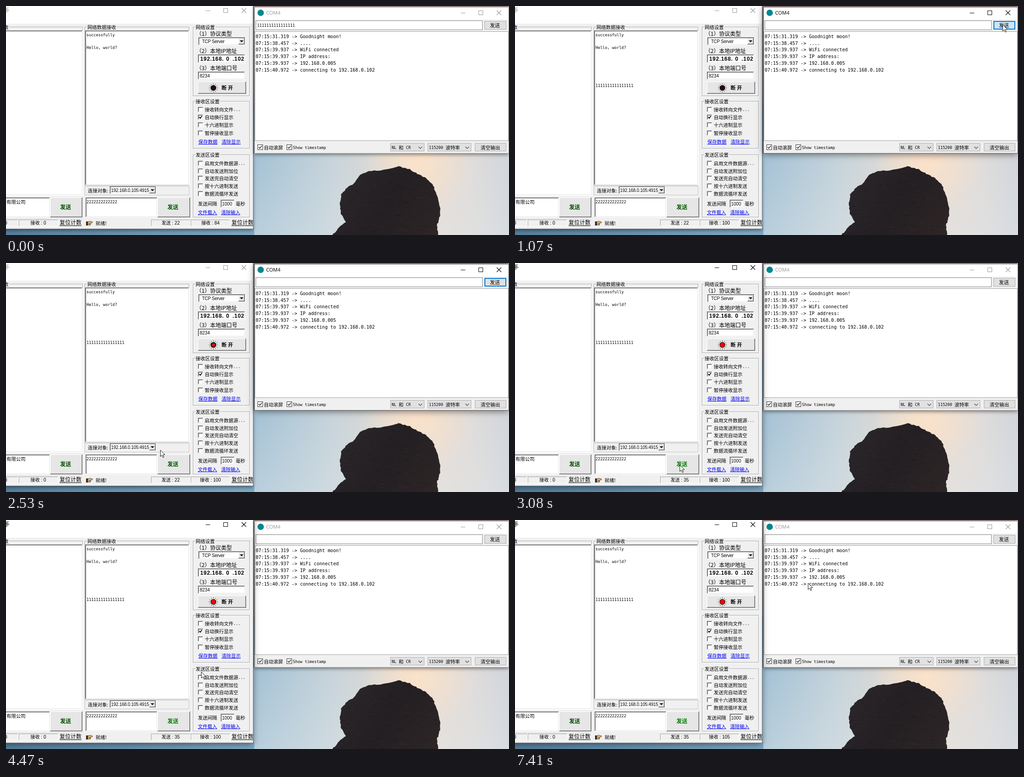
An HTML page with a canvas that plays this animation: 1106x506 px, repeating every 8000 ms.

```html
<!DOCTYPE html>
<html lang="zh-CN">
<head>
<meta charset="utf-8">
<title>Serial and TCP test</title>
<style>
html, body { margin: 0; width: 100%; height: 100%; overflow: hidden; background: #f0f0f0; }
canvas { display: block; width: 1106px; height: 506px; }
</style>
</head>
<body>
<canvas id="stage" width="1106" height="506"></canvas>
<script>
const c = document.getElementById('stage').getContext('2d');
const LOOP = 8000, STEP = 76.9, START = 145;
const CJK = '"Noto Sans CJK SC","Noto Sans CJK",sans-serif';
const SANS = '"Liberation Sans","Noto Sans CJK SC",sans-serif';
const MONO = '"DejaVu Sans Mono","Noto Sans CJK SC",monospace';
const FACE = '#f0f0f0';

// --- drawing helpers ---
function rect(x, y, w, h, color) { c.fillStyle = color; c.fillRect(x, y, w, h); }

function box(x, y, w, h, fill, edge, t = 1) {
  rect(x, y, w, h, edge);
  rect(x + t, y + t, w - 2 * t, h - 2 * t, fill);
}

// y is the visual middle of the line
function text(s, x, y, size = 10.5, family = CJK, color = '#000', align = 'left', weight = '') {
  c.font = `${weight} ${size}px ${family}`;
  c.fillStyle = color;
  c.textAlign = align;
  c.fillText(s, x, y + size * 0.37);
}
const mono = (s, x, y, size = 8.65, color) => text(s, x, y, size, MONO, color);
const sans = (s, x, y, size = 10, align) => text(s, x, y, size, SANS, '#000', align);

function spaced(gap, draw) {
  c.letterSpacing = gap + 'px';
  draw();
  c.letterSpacing = '0px';
}

function line(points, color, width = 1) {
  c.beginPath();
  points.forEach(([x, y], i) => i ? c.lineTo(x, y) : c.moveTo(x, y));
  c.strokeStyle = color;
  c.lineWidth = width;
  c.stroke();
}

function disc(x, y, r, color) {
  c.beginPath();
  c.arc(x, y, r, 0, Math.PI * 2);
  c.fillStyle = color;
  c.fill();
}

function gradient(x0, y0, x1, y1, ...stops) {
  const g = c.createLinearGradient(x0, y0, x1, y1);
  stops.forEach(([at, color]) => g.addColorStop(at, color));
  return g;
}

function sunken(x, y, w, h, fill = '#fff') {
  rect(x, y, w, h, '#fff');
  rect(x, y, w - 1, h - 1, '#8c8c8c');
  rect(x + 1, y + 1, w - 2, h - 2, '#e3e3e3');
  rect(x + 1, y + 1, w - 3, h - 3, '#606060');
  rect(x + 2, y + 2, w - 4, h - 4, fill);
}

function raised(x, y, w, h) {
  rect(x, y, w, h, '#666');
  rect(x, y, w - 1, h - 1, '#fff');
  rect(x + 1, y + 1, w - 2, h - 2, '#a0a0a0');
  rect(x + 1, y + 1, w - 3, h - 3, '#e6e6e6');
}

function group(x, y, w, h, label, labelX = x + 6) {
  for (const [d, color] of [[1, '#fff'], [0, '#a5a5a5']]) {
    c.strokeStyle = color;
    c.lineWidth = 1;
    c.strokeRect(x + d + 0.5, y + d + 0.5, w - 1, h - 1);
  }
  c.font = '10.5px ' + CJK;
  rect(labelX - 1, y - 4, c.measureText(label).width + 2, 9, FACE);
  text(label, labelX, y + 1);
}

function combo(x, y, w, h, s, sx) {
  sunken(x, y, w, h);
  raised(x + w - 16, y + 2, 14, h - 4);
  const mx = x + w - 9, my = y + h / 2;
  c.fillStyle = '#000';
  c.beginPath();
  c.moveTo(mx - 4, my - 2); c.lineTo(mx + 4, my - 2); c.lineTo(mx, my + 2);
  c.fill();
  spaced(-0.3, () => sans(s, sx, my));
}

function check(y, label, { on, dots } = {}) {
  sunken(422, y - 6, 12, 12);
  if (on) line([[425, y - 1], [427, y + 2], [431, y - 3]], '#000', 1.8);
  text(label, 437, y);
  if (dots) mono('...', 437 + label.length * 10.5, y);
}

function link(s, x, y) {
  text(s, x, y, 10.5, CJK, '#0000f0');
  rect(x, y + 5, 42, 1, '#0000f0');
}

function winButtons(x, y, color) {
  rect(x, y, 10, 1, color);
  c.strokeStyle = color;
  c.lineWidth = 1;
  c.strokeRect(x + 39.5, y - 4.5, 9, 9);
  line([[x + 79, y - 5], [x + 89, y + 5]], color, 1.1);
  line([[x + 89, y - 5], [x + 79, y + 5]], color, 1.1);
}

// --- desktop ---
const ROCK = [[718, 506], [729, 492], [747, 477], [737, 459], [734, 440], [737, 416], [747, 404],
  [765, 392], [779, 373], [797, 365], [830, 363], [850, 358], [863, 354], [888, 361], [905, 371],
  [924, 381], [938, 393], [945, 412], [952, 432], [955, 452], [953, 470], [948, 484], [950, 506]];

function seeded(seed) {
  return () => (seed = (seed * 16807) % 2147483647) / 2147483647;
}

function desktop() {
  rect(0, 0, 1106, 506, gradient(546, 0, 1106, 0, [0, '#a3c1d5'], [0.3, '#c6d3da'],
    [0.62, '#eaddd2'], [0.85, '#e0dcda'], [1, '#d1d5db']));
  rect(546, 326, 560, 180, gradient(0, 326, 0, 506,
    [0, 'rgba(225,232,235,0)'], [1, 'rgba(225,232,235,.35)']));
  const glow = c.createRadialGradient(905, 345, 5, 905, 345, 120);
  glow.addColorStop(0, 'rgba(252,226,200,.85)');
  glow.addColorStop(1, 'rgba(252,226,200,0)');
  rect(740, 326, 366, 180, glow);
  rect(0, 490, 546, 16, gradient(0, 0, 543, 0, [0, '#557f9c'], [1, '#7fa9c4']));
  rect(543, 0, 4, 326, gradient(0, 0, 0, 326,
    [0, '#ab9296'], [0.65, '#8d8494'], [0.66, '#5f8098'], [1, '#7595aa']));
  rect(546, 0, 560, 3, '#a99090');
  rect(1104, 0, 2, 326, '#c9aca2');

  const rnd = seeded(41);
  c.save();
  c.beginPath();
  ROCK.forEach(([x, y], i) => {
    if (!i) return c.moveTo(x, y);
    const [px, py] = ROCK[i - 1];
    for (let k = 1; k <= 5; k++) {
      const f = k / 5;
      c.lineTo(px + (x - px) * f + rnd() * 2 - 1, py + (y - py) * f + rnd() * 2 - 1);
    }
  });
  c.closePath();
  c.fillStyle = gradient(735, 360, 950, 490, [0, '#2b272a'], [0.5, '#231f22'], [1, '#2d2526']);
  c.fill();
  c.clip();
  c.globalAlpha = 0.3;
  for (let i = 0; i < 260; i++) {
    const x = 720 + rnd() * 235, y = 355 + rnd() * 150;
    line([[x, y], [x + 4 + rnd() * 10, y + rnd() * 5 - 2]], rnd() < 0.5 ? '#151315' : '#413a3a');
  }
  c.restore();
}

function shadow(x, y, w, h, blur) {
  c.save();
  c.shadowColor = 'rgba(0,0,0,.5)';
  c.shadowBlur = blur;
  c.shadowOffsetY = 2;
  rect(x, y, w, h, '#888');
  c.restore();
}

// --- TCP tool window ---
function tcpWindow(s) {
  c.save();
  shadow(-20, -10, 563, 503, s.tcpActive ? 14 : 8);
  rect(0, 0, 544, 493, '#707780');
  rect(0, 0, 543, 492, FACE);
  rect(0, 0, 543, 39, '#fff');
  c.beginPath();
  c.rect(0, 0, 543, 493);
  c.clip();

  const ink = s.tcpActive ? '#000' : '#999';
  text('手', -4, 10, 12, CJK, ink);
  winButtons(439, 10, ink);

  group(-20, 46, 189, 372, '网络数据接收', -57.5);
  sunken(-10, 54, 179, 364);
  group(173, 46, 230, 351, '网络数据接收', 179);
  sunken(174, 54, 229, 342);
  mono('successfully', 177, 64);
  mono('Hello, world?', 177, 92);
  if (s.received) mono('1'.repeat(16), 177, 176);

  c.strokeStyle = '#c8c8c8';
  c.strokeRect(173.5, 398.5, 229, 19);
  text('连接对象:', 180, 408);
  combo(228, 398, 103, 18, '192.168.0.105:4915', 231);

  sunken(-10, 423, 107, 44);
  text('技有限公司', -9.5, 433);
  raised(97, 423, 71, 44);
  text('发送', 131, 445, 12, CJK, '#005000', 'center', 'bold');
  sunken(175, 423, 158, 44);
  mono('2'.repeat(13), 177, 433);
  raised(333, 423, 72, 44);
  text('发送', 367, 445, 12, CJK, s.tcpActive ? '#008000' : '#005c00', 'center', 'bold');

  settings(s);
  statusBar(s);
  c.restore();
}

function lamp(x, y, level) {
  for (let i = 0; i < 12; i++) {
    const a = i * Math.PI / 6, dx = Math.cos(a), dy = Math.sin(a);
    line([[x + dx * 7.8, y + dy * 7.8], [x + dx * 10, y + dy * 10]], '#333');
  }
  disc(x, y, 6.2, '#111');
  disc(x, y, 4.9, '#2c0808');
  disc(x, y, 5 * level, level < 1 ? '#d01414' : '#ff0000');
}

function settings(s) {
  group(411, 46, 125, 153, '网络设置', 417);
  text('（1）协议类型', 418, 62, 12);
  combo(423, 69, 104, 18, 'TCP Server', 431);
  text('（2）本地IP地址', 418, 100, 12);
  sunken(422, 107, 104, 19);
  spaced(0.7, () => [['192.', 427], ['168.', 453], ['0', 484], ['.102', 498]].forEach(([p, x]) =>
    text(p, x, 117, 12, SANS, '#000', 'left', 'bold')));
  text('（3）本地端口号', 418, 138, 12);
  sunken(422, 145, 104, 18);
  sans('8234', 426, 154);
  raised(422, 167, 106, 27);
  lamp(456, 181, s.lamp);
  spaced(3, () => text('断开', 474, 181, 11, CJK, '#000', 'left', 'bold'));

  group(411, 210, 125, 105, '接收区设置');
  check(229, '接收转向文件', { dots: true });
  check(246, '自动换行显示', { on: true });
  check(263, '十六进制显示');
  check(281, '暂停接收显示');
  link('保存数据', 423, 300);
  link('清除显示', 474, 300);

  group(411, 328, 125, 139, '发送区设置');
  ['启用文件数据源', '自动发送附加位', '发送完自动清空', '按十六进制发送', '数据流循环发送']
    .forEach((label, i) => check(348 + Math.round(i * 16.7), label, { dots: i === 0 }));
  text('发送间隔', 422, 437);
  sunken(472, 428, 31, 18);
  sans('1000', 475, 437);
  text('毫秒', 505, 437);
  link('文件载入', 422, 456);
  link('清除输入', 473, 456);
}

function statusBar(s) {
  const cell = (x, w) => {
    rect(x, 472, w, 15, '#fff');
    rect(x, 472, w - 1, 14, '#a5a5a5');
    rect(x + 1, 473, w - 2, 13, FACE);
  };
  const reset = x => {
    text('复位计数', x, 479, 12);
    rect(x, 485, 48, 1, '#000');
  };
  rect(0, 470, 543, 1, '#d8d8d8');
  cell(-60, 87);
  cell(28, 87);
  sans('0', -3, 479);
  sans('接收 : 0', 71, 479, 10.2, 'center');
  reset(118);
  rect(168, 470, 375, 20, FACE);
  hand();
  text(s.hint, 197, 480);
  rect(319, 471, 224, 18, FACE);
  cell(319, 87);
  cell(406, 87);
  sans('发送 : ' + s.sent, 362, 479, 10.2, 'center');
  sans('接收 : ' + s.count, 449.5, 479, 10.2, 'center');
  reset(496);
}

function hand() {
  rect(176, 476, 4, 9, '#3a2c1e');
  c.beginPath();
  c.moveTo(180, 477); c.lineTo(184, 475.5); c.lineTo(190, 477); c.lineTo(190, 479);
  c.lineTo(186, 479.5); c.lineTo(186, 484); c.lineTo(180, 484);
  c.closePath();
  c.fillStyle = '#e2bd84';
  c.fill();
  c.strokeStyle = '#4a3520';
  c.lineWidth = 0.9;
  c.stroke();
  line([[182, 480], [186, 480]], '#4a3520', 0.8);
  line([[182, 482], [186, 482]], '#4a3520', 0.8);
}

// --- serial monitor window ---
const LOG = ['31.319 -> Goodnight moon!', '38.457 -> ....', '39.937 -> WiFi connected',
  '39.937 -> IP address:', '39.937 -> 192.168.0.005', '40.972 -> connecting to 192.168.0.102'];

function serialWindow(s) {
  const ink = s.serialActive ? '#000' : '#999';
  shadow(546, 2, 559, 324, s.serialActive ? 14 : 8);
  box(546, 2, 560, 324, FACE, s.serialActive ? '#5d5d60' : '#9a9a9c');
  rect(547, 3, 557, 27, '#fff');
  disc(560, 15, 7, '#00878f');
  text('COM4', 572, 15, 11, '"Open Sans","Noto Sans",sans-serif', ink);
  winButtons(1000, 15, ink);

  box(549, 32, 499, 21, '#fff', '#8a8a8a');
  if (!s.cleared) mono('1'.repeat(16), 552, 43);
  const edge = s.focus ? '#0078d7' : '#adadad';
  box(1052, 33, 48, 19, s.pressed ? '#cce4f7' : '#e1e1e1', edge, s.focus ? 2 : 1);
  text('发送', 1075, 43, 11, CJK, '#000', 'center');

  box(547, 56, 558, 242, '#fff', '#a0a0a0');
  LOG.forEach((row, i) => mono('07:15:' + row, 549, 67 + i * 14.8, 10.12));

  for (const x of [553, 617]) {
    box(x, 306, 12, 12, '#fff', '#333');
    line([[x + 2.5, 312], [x + 5, 314.5], [x + 9.5, 309]], '#111', 1.2);
  }
  text('自动滚屏', 567, 313);
  mono('Show timestamp', 631, 313);
  for (const [x, w] of [[845, 75], [927, 96]]) {
    box(x, 303, w, 18, '#e1e1e1', '#adadad');
    const ax = x + w - 9;
    line([[ax - 4, 311], [ax, 315], [ax + 4, 311]], '#444', 1.1);
  }
  mono('NL', 848, 313);
  text('和', 863.5, 313);
  mono('CR', 879.5, 313);
  mono('115200', 930, 313);
  text('波特率', 966.5, 313);
  box(1031, 303, 69, 18, '#e1e1e1', '#adadad');
  text('清空输出', 1065, 313, 10.7, CJK, '#000', 'center');
}

// --- pointer: time, x, y ---
const PATH = [[220, 760, 457], [500, 930, 260], [840, 1072, 41], [1120, 1072, 41],
  [1400, 640, 250], [1740, 182, 444], [1950, 180, 444], [2525, 338, 412], [2680, 362, 446],
  [3080, 362, 446], [3750, 434, 357], [3850, 434, 352], [4080, 436, 316], [4300, 436, 316],
  [4440, 429, 335], [4580, 431, 334], [4720, 440, 313], [4860, 454, 326], [5020, 456, 326],
  [5500, 457, 326], [5560, 458, 326], [5930, 458, 326], [6060, 462, 323], [6090, 462, 323],
  [6570, 631, 136], [6930, 631, 136], [7250, 642, 139], [7330, 642, 139], [7370, 644, 139]];

function pointer(t) {
  const q = START + Math.floor((t - START) / STEP) * STEP;
  if (q < PATH[0][0]) return;
  let [, x, y] = PATH[PATH.length - 1];
  const i = PATH.findIndex(p => p[0] > q);
  if (i > 0) {
    const [t0, x0, y0] = PATH[i - 1], [t1, x1, y1] = PATH[i];
    const f = (q - t0) / (t1 - t0);
    x = Math.round(x0 + (x1 - x0) * f);
    y = Math.round(y0 + (y1 - y0) * f);
  }
  c.save();
  c.translate(x + 0.5, y + 0.5);
  c.beginPath();
  [[0, 0], [0, 14], [3.2, 11], [5.6, 16.3], [7.8, 15.4], [5.5, 10.3], [10, 10]]
    .forEach(([px, py]) => c.lineTo(px, py));
  c.closePath();
  c.fillStyle = '#fff';
  c.fill();
  c.strokeStyle = '#000';
  c.lineWidth = 0.9;
  c.stroke();
  c.restore();
}

function stateAt(t) {
  const between = (a, b) => t >= a && t < b;
  return {
    serialActive: between(150, 3000),
    tcpActive: t >= 3000,
    cleared: t >= 985,
    received: t >= 985,
    pressed: between(840, 1200),
    focus: between(840, 3000),
    lamp: t < 2300 ? 0 : t < 3000 ? 0.75 : 1,
    hint: between(3690, 4000) ? '每发送一组数据，自动在末尾' : '就绪!',
    sent: t < 3070 ? 22 : 35,
    count: t < 985 ? 84 : t < 5935 ? 100 : 105
  };
}

function frame(now) {
  const t = now % LOOP, s = stateAt(t);
  desktop();
  if (s.tcpActive) { serialWindow(s); tcpWindow(s); }
  else { tcpWindow(s); serialWindow(s); }
  pointer(t);
  requestAnimationFrame(frame);
}
requestAnimationFrame(frame);
</script>
</body>
</html>
```
